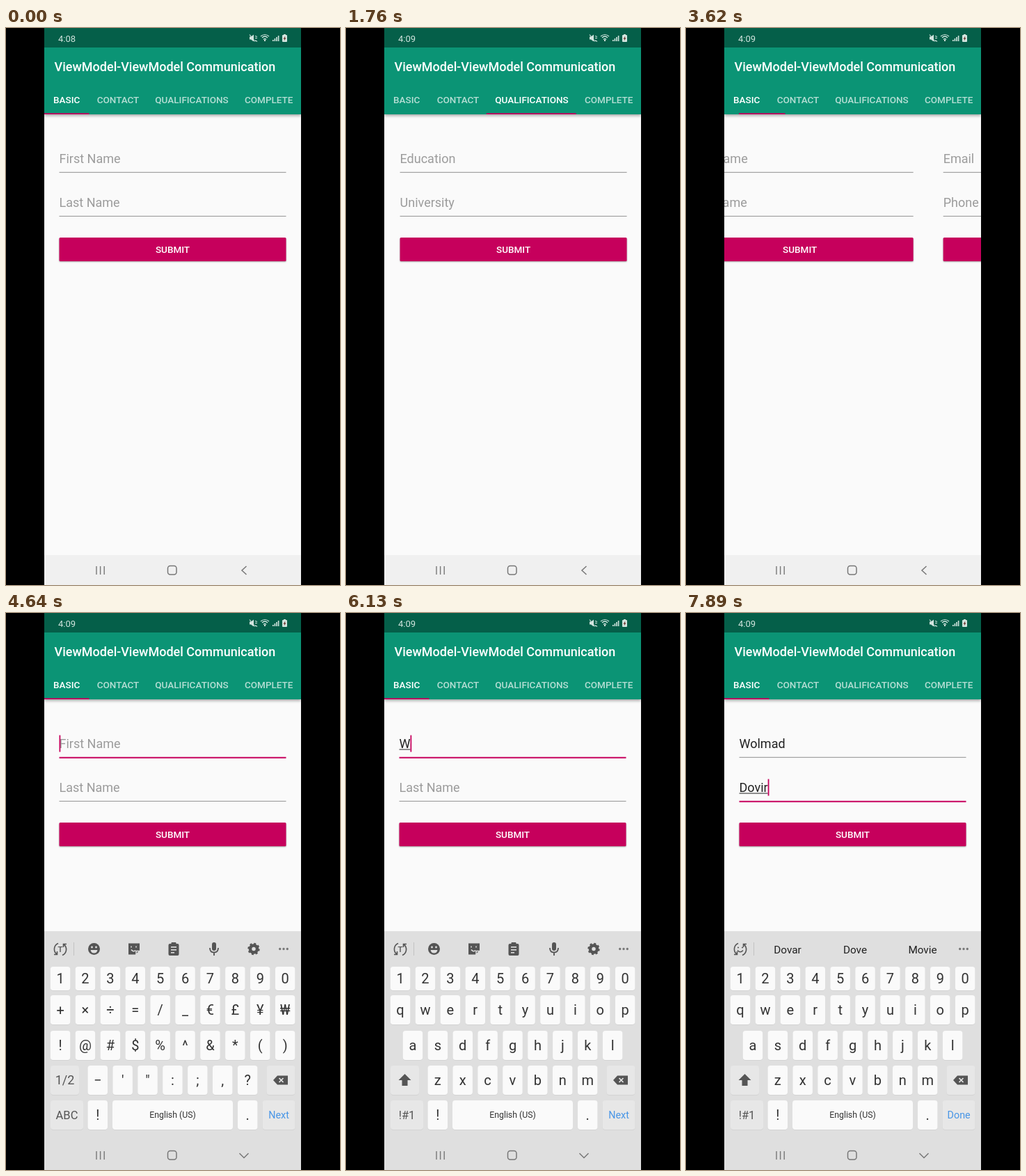
An HTML page with a canvas that plays this animation: 480x800 px, repeating every 8 s.

```html
<!DOCTYPE html>
<html lang="en">
<head>
<meta charset="utf-8">
<title>Form pager</title>
<style>
html, body { margin: 0; width: 100%; height: 100%; overflow: hidden; background: #000; }
canvas { display: block; }
</style>
</head>
<body>
<canvas id="stage" width="480" height="800"></canvas>
<script>
const ctx = document.getElementById('stage').getContext('2d');
const LOOP = 8000, LEFT = 55, WIDTH = 369, MID = 239.5;
const PINK = '#c6005c', PAPER = '#fafafa', INK = '#222', ICON = '#555';

const TABS = ['BASIC', 'CONTACT', 'QUALIFICATIONS', 'COMPLETE'];
const TAB_CENTERS = [87.2, 161, 267, 377.7];
const EDGES = [55, 119.5, 202, 331, 424];
const FORMS = [['First Name', 'Last Name'], ['Email', 'Phone'], ['Education', 'University']];
const SUMMARY = ['Name:', 'Email:', 'Phone:', 'Qualification:', 'University:'];

const TYPED = [
  { word: 'Wolmad', keys: [5850, 6200, 6330, 6480, 6620, 6790], hints: ['Wolmad', 'Wolf', 'Walnut'] },
  { word: 'Dovir', keys: [7150, 7330, 7480, 7640, 7800], hints: ['Dovar', 'Dove', 'Movie'] }
];
const TAP_BASIC = 3455, FOCUS = 4070, KEYBOARD = 4150, LETTERS = 5480, NEXT = 6880;

const clamp = v => Math.min(1, Math.max(0, v));
const lerp = (a, b, k) => a + (b - a) * k;
const progress = (t, start, end) => clamp((t - start) / (end - start));
const swipe = (t, start, end) => 1 - (1 - progress(t, start, end) ** 1.3) ** 3;

function rect(x, y, w, h, color, r = 0) {
  ctx.fillStyle = color;
  ctx.beginPath();
  ctx.roundRect(x, y, w, h, r);
  ctx.fill();
}

function text(str, x, y, size, color, weight = 400, align = 'left') {
  ctx.font = `${weight} ${size}px Roboto, sans-serif`;
  ctx.textAlign = align;
  ctx.fillStyle = color;
  ctx.fillText(str, x, y);
  return ctx.measureText(str).width;
}

// Fills the path, or strokes it when a line width is given.
function shape(d, x, y, color, line = 0, dash = []) {
  ctx.save();
  ctx.translate(x, y);
  ctx.fillStyle = ctx.strokeStyle = color;
  ctx.lineWidth = line;
  ctx.setLineDash(dash);
  if (line) ctx.stroke(new Path2D(d)); else ctx.fill(new Path2D(d));
  ctx.restore();
}

const circle = r => `M${r} 0A${r} ${r} 0 1 1 ${-r} 0A${r} ${r} 0 1 1 ${r} 0Z`;

function dropShadow(draw, blur = 2, y = 1) {
  ctx.save();
  ctx.shadowColor = 'rgba(0,0,0,.35)';
  ctx.shadowBlur = blur;
  ctx.shadowOffsetY = y;
  draw();
  ctx.restore();
}

function button(label, x, y, w) {
  dropShadow(() => rect(x, y, w, 34, PINK, 1.5));
  text(label, x + w / 2, y + 22, 13.5, '#fff', 500, 'center');
}

function pagePosition(t) {
  if (t >= TAP_BASIC) return 3 * (1 - progress(t, TAP_BASIC, TAP_BASIC + 400)) ** 5;
  return swipe(t, 60, 560) + swipe(t, 1250, 1825) + swipe(t, 1900, 2410);
}

function drawHeader(t, position) {
  dropShadow(() => rect(LEFT, 28, WIDTH, 96, '#0b9475'), 4, 1.5);
  rect(LEFT, 0, WIDTH, 28, '#055f49');
  text(t < 1300 ? '4:08' : '4:09', 75, 19.5, 13, '#d3e5df');

  const pale = '#d3e5df';
  shape('M-5-2h2l4-3v10l-4-3h-2z', 355, 14.5, pale);
  shape('M-5-5L3 5M3-3l3 1M3 0h3M3 3l3 2', 355, 14.5, pale, 1.2);
  shape('M-6-2Q0-7 6-2M-4 0Q0-4 4 0M-2 2.5Q0 .5 2 2.5', 372, 14, pale, 1.2);
  shape('M-1 4h2v2h-2z', 372, 13, pale);
  for (let i = 0; i < 4; i++) rect(383 + i * 2.6, 17 - i * 2, 1.6, 2 + i * 2, pale);
  rect(397, 10, 7, 10, pale, 1);
  rect(399, 9, 3, 2, pale);
  shape('M.8-3.5L-2 .8h1.6L-.8 3.5 2-.8H.4z', 400.5, 15, '#723b35');

  text('ViewModel-ViewModel Communication', 69.5, 62, 18, '#fff', 500);
  const selected = t >= TAP_BASIC ? 0 : Math.round(position + .15);
  TABS.forEach((tab, i) =>
    text(tab, TAB_CENTERS[i], 108, 13.5, i === selected ? '#fff' : '#b5ded4', 500, 'center'));

  const tapped = t >= TAP_BASIC;
  const from = tapped ? 3 : Math.min(2, Math.floor(position));
  const to = tapped ? 0 : from + 1;
  const k = tapped ? 1 - (1 - progress(t, TAP_BASIC, TAP_BASIC + 300)) ** 3.2 : position - from;
  const x = lerp(EDGES[from], EDGES[to], k), end = lerp(EDGES[from + 1], EDGES[to + 1], k);
  rect(x, 122.3, end - x, 1.8, PINK);
}

function drawField(hint, value, y, focused, cursor) {
  const x = 76.5;
  let width = 0;
  if (value) {
    width = text(value, x, y, 18, INK);
    if (focused) rect(x, y + 1.5, width, 1, INK);
  } else {
    text(hint, x, y, 18, '#9c9c9c');
  }
  if (focused) rect(x, y + 12.8, 326, 2, PINK);
  else rect(x, y + 12.7, 326, 1.2, '#a4a4a4');
  if (cursor) rect(x + width, y - 18.5, 1.8, 24, PINK);
}

function drawPages(t, position, values, active) {
  const typing = t >= TYPED[0].keys[0];
  const cursor = t >= FOCUS && (typing || (t - 4400) % 1000 < 500);
  ctx.save();
  ctx.beginPath();
  ctx.rect(LEFT, 124, WIDTH, 634);
  ctx.clip();
  TABS.forEach((_, page) => {
    const offset = (page - position) * WIDTH;
    if (Math.abs(offset) >= WIDTH) return;
    ctx.save();
    ctx.translate(offset, 0);
    if (page < 3) {
      FORMS[page].forEach((hint, i) => {
        const focused = page === 0 && i === active && t >= FOCUS;
        drawField(hint, page ? '' : values[i], 194 + i * 63, focused, focused && cursor);
      });
      button('SUBMIT', 76.5, 301, 326);
    } else {
      SUMMARY.forEach((label, i) => text(label, 90, 200 + i * 54, 19.7, '#707070', 700));
      button('CLEAR ALL', 94, 463, 291);
    }
    ctx.restore();
  });
  ctx.restore();
}

function key(label, x, y, w, h = 42, special = false, size = 20, color = '#333') {
  rect(x, y + .8, w, h, '#d0d0d0', 4);
  rect(x, y, w, h, special ? '#e7e7e7' : PAPER, 4);
  text(label, x + w / 2, y + h / 2 + size * .36, size, color, 400, 'center');
}

function keyRow(labels, x, y, h) {
  [...labels].forEach((label, i) => key(label, x + i * 35.9, y, 28.5, h));
}

function drawToolbar(hints) {
  shape('M-3-8.5A9 9 0 0 0-5 7M3 8.5A9 9 0 0 0 5-7M-9 7.5h4.5V3M9-7.5H4.5V-3', 78, 483, ICON, 1.6);
  rect(97, 473, 1, 19, '#c2c2c2');
  for (let i = -1; i < 2; i++) shape(circle(1.7), 399 + i * 5.3, 482.5, '#777');
  if (hints) {
    shape('M-4-2.5h2M2-2.5h2M-4 1.5Q0 6 4 1.5', 78, 483, ICON, 1.5);
    hints.forEach((word, i) => text(word, 146 + i * 97, 489, 15.3, INK, 400, 'center'));
    return;
  }
  text('T', 78, 487, 11.5, ICON, 500, 'center');

  const bg = '#dfdfdf';
  shape(circle(8.5), 126.5, 482.5, ICON);
  shape(circle(1.4), 123.5, 480, bg);
  shape(circle(1.4), 129.5, 480, bg);
  shape('M-5 1.5H5Q4 6 0 6T-5 1.5z', 126.5, 482.5, bg);

  shape('M-8-8H8V2L2 8H-8z', 184, 482.5, ICON);
  shape('M3 9V3H9M-4-4v2M3-4v2M-4 1Q-1 5 2 2', 184, 482.5, bg, 1.5);

  rect(233.5, 475, 15, 17, ICON, 2);
  rect(237.5, 473, 7, 4, ICON, 1);
  for (let i = 0; i < 3; i++) rect(237, 479 + i * 4, i === 2 ? 5 : 8, 1.6, bg);

  rect(296, 473, 6, 12, ICON, 3);
  shape('M-6-1Q-6 5.5 0 5.5T6-1M0 5.5V10', 299, 482, ICON, 1.8);

  shape(circle(5), 356, 482.5, ICON, 4.5);
  shape(circle(7.2), 356, 482.5, ICON, 3, [2.83, 2.83]);
}

function drawKeyboard(t, value, active) {
  const slide = (1 - progress(t, KEYBOARD, KEYBOARD + 270)) ** 2 * 300;
  const letters = t >= LETTERS;
  const cased = s => value ? s : s.toUpperCase();
  ctx.save();
  ctx.beginPath();
  ctx.rect(LEFT, 457, WIDTH, 300);
  ctx.clip();
  ctx.translate(0, slide);
  rect(LEFT, 457, WIDTH, 300, '#dfdfdf');
  drawToolbar(value.length > 1 && TYPED[active].hints);

  keyRow('1234567890', 63.8, 508, 34);
  keyRow(letters ? cased('qwertyuiop') : '+×÷=/_€£¥₩', 63.8, 549);
  keyRow(letters ? cased('asdfghjkl') : '!@#$%^&*()', letters ? 81.7 : 63.8, 600);
  keyRow(letters ? cased('zxcvbnm') : '−\'":;,?', 117.5, 650);

  key(letters ? '' : '1/2', 64, 650, 41, 42, true, 18, ICON);
  if (letters) shape('M0-9L9 0H4V8H-4V0H-9z', 84.5, 671, ICON);
  key('', 374.5, 650, 41, 42, true);
  shape('M-11 0l6-6.5H10v13H-5z', 395, 671, ICON);
  shape('M-2-3l6 6M4-3l-6 6', 394.5, 671, '#e7e7e7', 1.7);

  key(letters ? '!#1' : 'ABC', 64, 700, 47, 42, true, 16.5, ICON);
  key('!', 117.5, 700, 28.5);
  key('English (US)', 153, 700, 173, 42, false, 12.3);
  key('.', 333, 700, 28.5);
  key(t < NEXT ? 'Next' : 'Done', 368.7, 700, 46.8, 42, true, 14.3, '#4795e6');
  ctx.restore();
}

function drawNavigation(open) {
  const gray = '#777';
  rect(LEFT, 757, WIDTH, 43, open ? '#dfdfdf' : '#f0f0f0');
  for (let i = 0; i < 3; i++) rect(129.3 + i * 5.6, 773, 1.4, 12, gray);
  ctx.strokeStyle = gray;
  ctx.lineWidth = 1.5;
  ctx.beginPath();
  ctx.roundRect(232.5, 772.5, 12.5, 12.5, 3.5);
  ctx.stroke();
  shape(open ? 'M-6.5-3L0 3.5 6.5-3' : 'M3.5-6L-3 0 3.5 6', 342, 779, gray, 1.5);
}

function draw(t) {
  const position = pagePosition(t);
  const values = TYPED.map(({ word, keys }) => word.slice(0, keys.filter(k => k <= t).length));
  const active = t < NEXT ? 0 : 1;
  const open = t >= KEYBOARD;
  rect(0, 0, 480, 800, '#000');
  rect(LEFT, 0, WIDTH, 800, PAPER);
  drawPages(t, position, values, active);
  ctx.save();
  ctx.beginPath();
  ctx.rect(LEFT, 0, WIDTH, 800);
  ctx.clip();
  drawHeader(t, position);
  if (open) drawKeyboard(t, values[active], active);
  drawNavigation(open);
  ctx.restore();
}

const start = performance.now();
function tick() {
  draw((performance.now() - start) % LOOP);
  requestAnimationFrame(tick);
}
tick();
</script>
</body>
</html>
```
